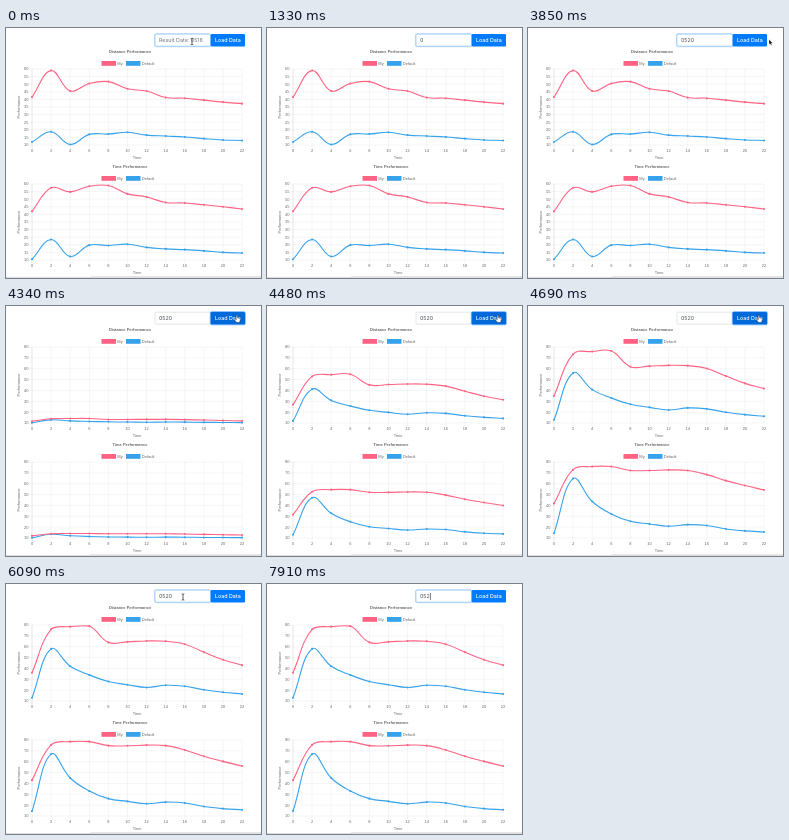
Animation of 255x250 px, one loop 8000 ms. Source, as an HTML page:

```html
<!DOCTYPE html>
<html lang="en">
<head>
<meta charset="utf-8">
<title>Performance charts</title>
<style>
  html, body { margin: 0; width: 100%; height: 100%; overflow: hidden; background: #fff; }
  svg { display: block; width: 255px; height: 250px; }
  text { font: 4px "Liberation Sans", Arial, sans-serif; fill: #666; white-space: pre; }
  .ui { font: 5.35px Inter, Roboto, sans-serif; fill: #495057; }
  .hint { fill: #6c757d; }
  .button { fill: #fff; font-weight: 500; }
  .title { font-weight: bold; }
  .mid { text-anchor: middle; }
  .end { text-anchor: end; }
  .tip { fill: #fff; }
</style>
</head>
<body>
<svg id="stage" viewBox="0 0 255 250"></svg>
<script>
const LOOP = 8000, TICK = 70;
const LOADED = 4340, GROW = 650;
const RED = '#ff6384', BLUE = '#36a2eb';
const LEFT = 26, STEP = 19.1, TOP = 41, BASE = 117, RIGHT = LEFT + 11 * STEP;

const before = {
  max: 60, step: 5,
  charts: [
    [[41.5, 59, 45.5, 50.5, 51.7, 47, 45.5, 41.2, 40.8, 39.5, 38.2, 37.2],
     [12, 18.7, 10.3, 17, 17.2, 18.4, 16.5, 15.9, 15.3, 14.2, 13.3, 13]],
    [[42, 57.5, 54.8, 58.5, 59, 53.5, 51.5, 47.8, 47.5, 46.3, 45, 43.6],
     [10.5, 23.5, 12.3, 19.8, 19.5, 20.4, 18.3, 17.3, 16.8, 16, 15, 14.6]]
  ]
};
const after = {
  max: 80, step: 10,
  charts: [
    [[36, 76, 78.5, 79, 64, 64.5, 65.3, 65, 62.32, 55, 48, 43],
     [13, 58, 42, 34, 28, 25, 22.5, 24.5, 23.59, 20.3, 18, 16.5]],
    [[43, 75.5, 78.5, 78.5, 74.8, 74.7, 75.3, 74.8, 70.8, 65, 60.3, 56],
     [14.5, 67, 45, 33, 26, 23.5, 21.3, 22.8, 22, 18.7, 16.8, 15.8]]
  ]
};

// Typed text by start time; the caret blinks at the listed toggles.
const typing = [[0, ''], [770, '0'], [1960, '05'], [2450, '052'], [2870, '0520'], [7910, '052']];
const caretOn = [[770, 1330], [1820, 3430], [3920, 4270], [5600, 6090], [6650, 7140], [7700, LOOP]];
// Pointer: time, x, y
const path = [[3430, 190, 13], [3640, 236, 10], [3850, 242, 14], [4060, 236, 14], [4200, 231, 13],
  [5110, 231, 13], [5180, 206, 50], [5250, 186, 48], [5320, 181, 17], [5670, 178, 14], [5880, 177, 13]];

const within = (t, [a, b]) => t >= a && t < b;
const lerp = (a, b, k) => a + (b - a) * k;

function along(t) {
  const i = path.findIndex(p => p[0] > t);
  if (i < 0) return path[path.length - 1].slice(1);
  if (i === 0) return path[0].slice(1);
  const [a, b] = [path[i - 1], path[i]], k = (t - a[0]) / (b[0] - a[0]);
  return [lerp(a[1], b[1], k), lerp(a[2], b[2], k)];
}

const text = (x, y, s, cls = '', more = '') => `<text x="${x}" y="${y}" class="${cls}" ${more}>${s}</text>`;
const rect = (x, y, w, h, fill, more = '') =>
  `<rect x="${x}" y="${y}" width="${w}" height="${h}" fill="${fill}" ${more}/>`;
const rule = (x1, y1, x2, y2, alpha) =>
  `<path d="M${x1} ${y1}L${x2} ${y2}" stroke="#000" stroke-opacity="${alpha}" stroke-width=".4"/>`;

// Cardinal spline with tension .4, its handles kept inside the plot.
function curve(pts) {
  const cap = y => Math.min(BASE, Math.max(TOP, y));
  const handles = pts.map((p, i) => {
    const a = pts[i - 1] || p, b = pts[i + 1] || p;
    const da = Math.hypot(p[0] - a[0], p[1] - a[1]), db = Math.hypot(b[0] - p[0], b[1] - p[1]);
    const fa = .4 * da / (da + db), fb = .4 * db / (da + db);
    const dx = b[0] - a[0], dy = b[1] - a[1];
    return [[p[0] - fa * dx, cap(p[1] - fa * dy)], [p[0] + fb * dx, cap(p[1] + fb * dy)]];
  });
  return 'M' + pts[0] + pts.slice(1).map((p, i) => `C${handles[i][1]} ${handles[i + 1][0]} ${p}`).join('');
}

function series(values, max, grown, color) {
  const pts = values.map((v, i) => [LEFT + i * STEP, BASE - (v - 10) / (max - 10) * (BASE - TOP) * grown]);
  return `<path d="${curve(pts)}" fill="none" stroke="${color}" stroke-width="1.1"/>` +
    pts.map(([x, y]) => `<circle cx="${x}" cy="${y}" r="1.05" fill="${color}"/>`).join('');
}

function chart(name, [mine, base], { max, step }, grown, dy) {
  let s = text(124, 25.4, name, 'title mid') +
    rect(95.5, 33, 14.5, 4.8, RED) + text(111.3, 36.9, 'My') +
    rect(120, 33, 14.5, 4.8, BLUE) + text(135.8, 36.9, 'Default');
  for (let v = 10; v <= max; v += step) {
    const y = BASE - (v - 10) / (max - 10) * (BASE - TOP);
    s += rule(LEFT - 3, y, RIGHT, y, .1) + text(22.4, y + 1.4, v, 'end');
  }
  for (let i = 0; i < 12; i++) {
    const x = LEFT + i * STEP;
    s += rule(x, TOP, x, BASE + 3, i ? .1 : .25) + text(x, 123.6, i * 2, 'mid');
  }
  s += text(131, 131.2, 'Time', 'mid') +
    text(0, 0, 'Performance', 'mid', 'transform="translate(14.2 79) rotate(-90)"') +
    series(base, max, grown, BLUE) + series(mine, max, grown, RED);
  return `<g transform="translate(0 ${dy})">${s}</g>`;
}

function form(t) {
  const typed = typing.filter(e => e[0] <= t).pop()[1];
  const pressed = within(t, [4270, 5600]), hover = within(t, [4130, 5110]);
  let s = rect(149, 6.2, 55.5, 12, '#fff', `rx="1.2" stroke="${pressed ? '#ced4da' : '#80bdff'}" stroke-width=".6"`);
  if (!pressed) s += rect(148.4, 5.6, 56.7, 13.2, 'none', 'rx="1.6" stroke="#007bff" stroke-opacity=".22" stroke-width=".9"');
  s += rect(204.7, 6, 34.3, 12.4, hover ? '#0069d9' : '#007bff', 'rx="1.2"');
  if (pressed) s += rect(204.3, 5.6, 35.1, 13.2, 'none', 'rx="1.6" stroke="#007bff" stroke-opacity=".5" stroke-width="1"');
  s += text(221.8, 14.3, 'Load Data', 'ui button mid');
  s += typed ? text(153, 14.3, typed, 'ui') : text(153, 14.3, 'Result Date: 0518', 'ui hint');
  if (caretOn.some(r => within(t, r))) s += rect(153.3 + typed.length * 3.36, 9, .6, 7, '#333');
  return s;
}

function tooltip(t) {
  if (!within(t, [5180, 5600])) return '';
  const alpha = t < 5390 ? 1 : 1 - (t - 5390) / 210;
  const row = (y, color, s) => rect(147.3, y - 3.3, 3.6, 3.6, color, 'stroke="#fff" stroke-width=".4"') + text(152, y, s, 'tip');
  return `<g opacity="${alpha}">` +
    rect(145, 72, 36.5, 18, '#000', 'rx="2" opacity=".75"') +
    '<path d="M181.5 79.3l1.7 1.7-1.7 1.7z" opacity=".75"/>' +
    text(147.3, 77.4, '16', 'tip title') + row(82.6, RED, 'My: 62.32') + row(87.8, BLUE, 'Default: 23.59') + '</g>';
}

function pointer(t) {
  if (within(t, [770, 3430]) || t >= 7910) return '';
  const [x, y] = t < 770 ? [186, 13.5] : along(t);
  const inField = x < 204 && y < 19, onButton = x > 204 && x < 239 && y < 19;
  const shape = inField
    ? '<path d="M-1.3-3.2Q0-3.2 0-2.4Q0-3.2 1.3-3.2M0-2.4V2.4M-1.3 3.2Q0 3.2 0 2.4Q0 3.2 1.3 3.2" fill="none" stroke="#222" stroke-width=".7"/>'
    : onButton
      ? '<path d="M-.8-3.5q.8-.8 1.4 0v2.2l2.2.6q.7.4.5 1.3l-.6 2.8h-3.2L-2.8.6q.2-1 1.2-.5l.8.7z" fill="#fff" stroke="#222" stroke-width=".5"/>'
      : '<path d="M-1-2.6v5.2l1.2-1 .8 1.8.9-.4-.8-1.7h1.6z" fill="#111" stroke="#fff" stroke-width=".3"/>';
  return `<g transform="translate(${x} ${y})">${shape}</g>`;
}

function scene(t) {
  const data = t < LOADED ? before : after;
  const k = Math.min(1, Math.max(0, (t - LOADED + 10) / GROW));
  const grown = t < LOADED ? 1 : 1 - (1 - k) ** 4;
  return form(t) +
    chart('Distance Performance', data.charts[0], data, grown, 0) +
    chart('Time Performance', data.charts[1], data, grown, 115) +
    rect(0, 249, 255, 1, '#ddd') + rect(84, 248, 171, 1.6, '#e4e4e4') +
    tooltip(t) + pointer(t);
}

const stage = document.getElementById('stage');
let shown = -1;
function draw() {
  const t = Math.floor(performance.now() % LOOP / TICK) * TICK;
  if (t !== shown) stage.innerHTML = scene(shown = t);
  requestAnimationFrame(draw);
}
draw();
</script>
</body>
</html>
```
